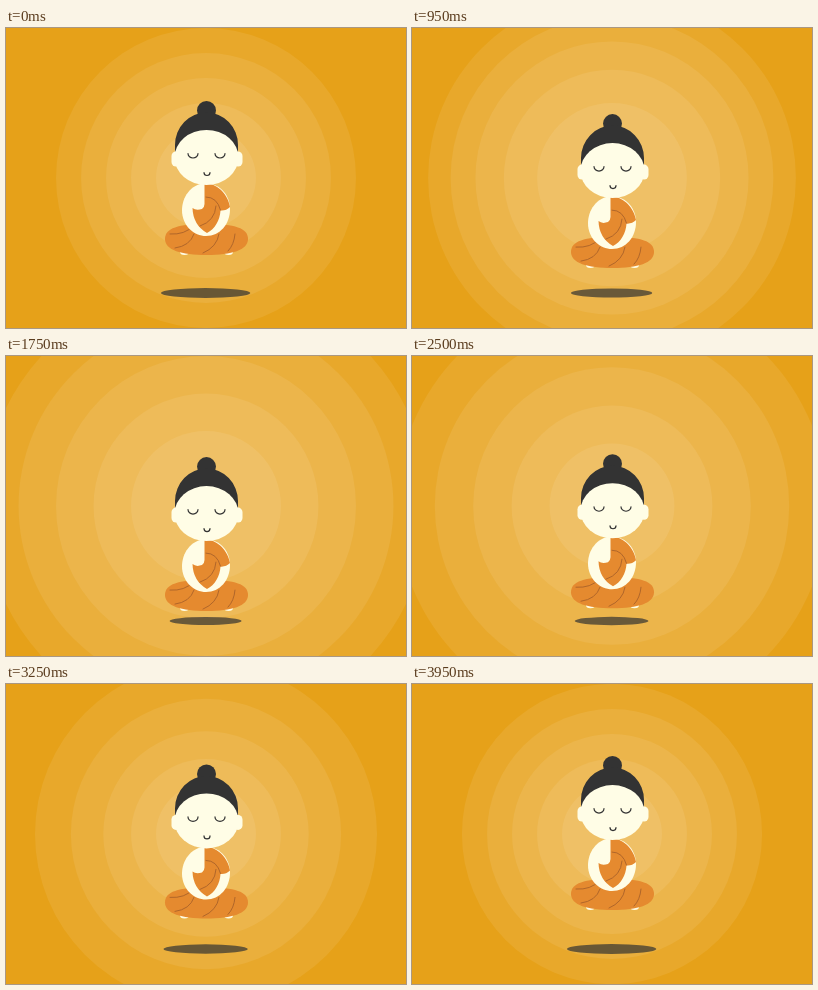
Recreate the animation shown at these times as an HTML page. Size 400x300 px, loop 4000 ms.

```html
<!DOCTYPE html>
<html>
<head>
<meta charset="utf-8">
<style>
html, body { margin: 0; height: 100%; overflow: hidden; background: #e6a119; }
svg { display: block; width: 400px; height: 300px; }
.cream { fill: #fffde6; }
.hair { fill: #333; }
.robe { fill: #e58a2f; }
.line { fill: none; stroke: #333; stroke-width: 1.2; stroke-linecap: round; }
.fold { fill: none; stroke: #b0662a; stroke-width: 1; stroke-linecap: round; }
</style>
</head>
<body>
<svg viewBox="0 0 400 300">
  <g id="rings" fill="#fff" fill-opacity=".08"></g>
  <ellipse id="shadow" cx="199.6" cy="265" class="hair" opacity=".7"/>
  <g id="monk">
    <!-- feet and legs -->
    <ellipse class="cream" cx="178.5" cy="224" rx="4.5" ry="3"/>
    <ellipse class="cream" cx="222.5" cy="224" rx="4.5" ry="3"/>
    <path class="robe" d="M159 211C159 200 172 196 200.500 196S242 200 242 211C242 222 226 227 200.500 227S159 222 159 211Z"/>
    <path class="fold" d="M164 206Q179 207 187 198M169 220Q184 218 188 206M197 225Q211 219 213 206M222 223Q228 217 229 206"/>
    <!-- body -->
    <path class="cream" d="M200 155C184 156 176 170 176 182C176 198 188 208 200 208C214 208 224 196 224 181C224 168 215 156 200 155Z"/>
    <path class="robe" d="M198.500 156C210 154 222 166 224 179Q220 183 214.500 182.500C214 192 209 201 201 205Q187 197 186.500 180Q190 183 196 181Q198.500 179 198.500 176Z"/>
    <path class="fold" d="M200 169Q211 169 214.500 182M194 198Q209 193 210 178"/>
    <!-- head -->
    <circle class="hair" cx="200.500" cy="82.500" r="9.500"/>
    <path class="hair" d="M169 125V117A31.500 32.500 0 0 1 232 117V125Z"/>
    <rect class="cream" x="165.500" y="123.500" width="9" height="15" rx="4.500"/>
    <rect class="cream" x="227.500" y="123.500" width="9" height="15" rx="4.500"/>
    <ellipse class="cream" cx="200.500" cy="129.500" rx="32" ry="27.500"/>
    <path class="line" d="M182 125.500a5 4.500 0 0 0 10 0M209 125.500a5 4.500 0 0 0 10 0M198 144.500a3 3 0 0 0 6 0"/>
  </g>
</svg>
<script>
const HALF = 2000;
const $ = id => document.getElementById(id);
const ease = p => p < .5 ? 2 * p * p : 1 - 2 * (1 - p) ** 2;

const rings = [150, 125, 100, 75, 50].map(radius => {
  const el = document.createElementNS("http://www.w3.org/2000/svg", "circle");
  el.setAttribute("cx", 200);
  el.setAttribute("cy", 150);
  $("rings").append(el);
  return { el, radius, duration: 500 + radius * 10 };
});

function draw(now) {
  const t = now % (2 * HALF);
  const back = t >= HALF;
  const progress = duration => {
    const p = ease(Math.min(1, (t % HALF) / duration));
    return back ? 1 - p : p;
  };
  for (const { el, radius, duration } of rings)
    el.setAttribute("r", radius * (1 + .5 * progress(duration)));

  const p = progress(HALF);
  // the rise ends one pixel above where the descent begins
  const y = back ? 30 * p - 1 : 29 * p;
  $("monk").setAttribute("transform", `translate(0 ${y})`);
  $("shadow").setAttribute("rx", 44.7 * (1 - .2 * p));
  $("shadow").setAttribute("ry", 5 * (1 - .2 * p));
}

const start = performance.now();
function frame() {
  draw(performance.now() - start);
  requestAnimationFrame(frame);
}
frame();
</script>
</body>
</html>
```
